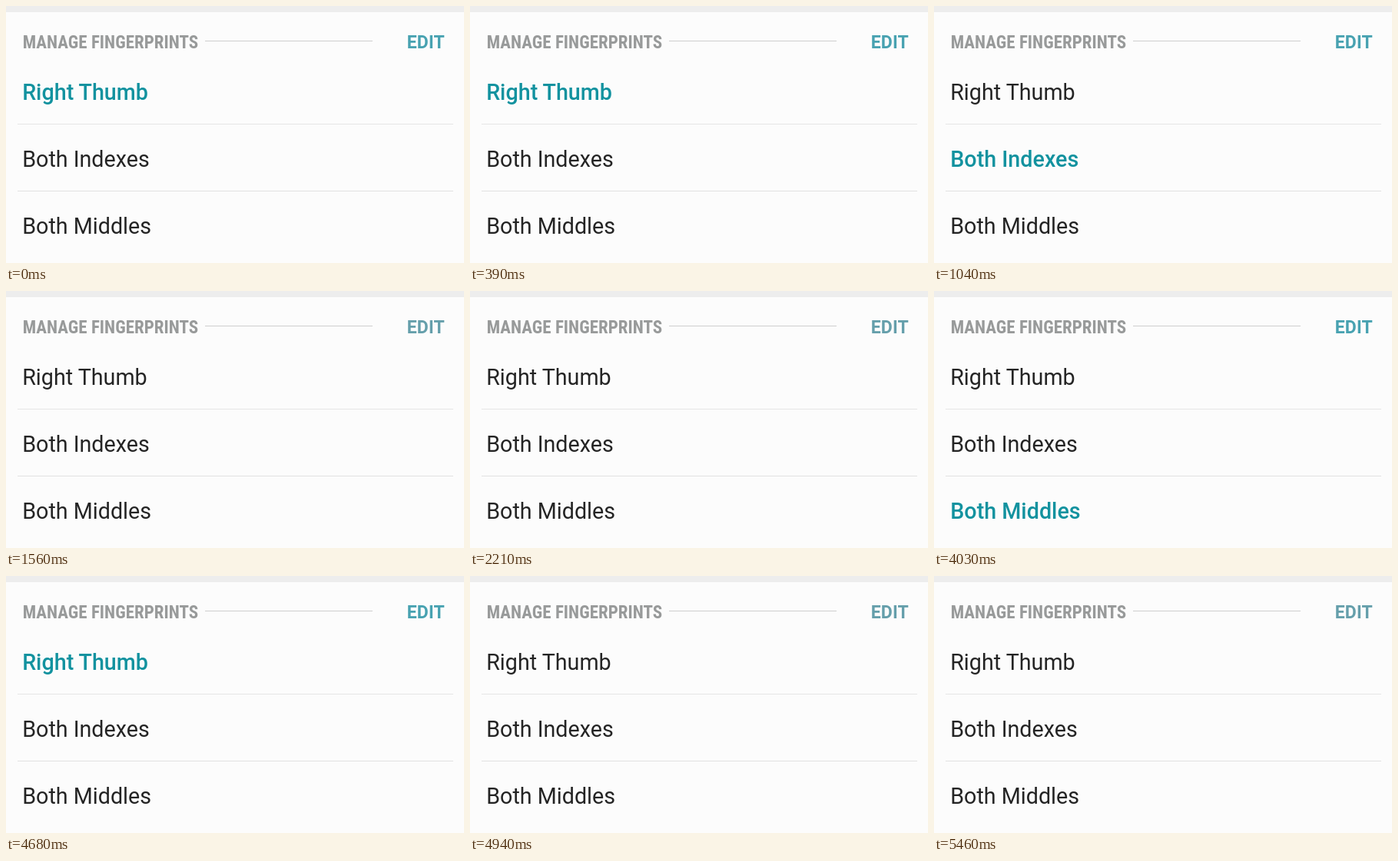
Animation of 596x334 px, one loop 5.98 s. Source, as an HTML page:

```html
<!DOCTYPE html>
<html lang="en">
<head>
<meta charset="utf-8">
<title>Manage fingerprints</title>
<style>
  html, body { margin: 0; width: 100%; height: 100%; overflow: hidden; background: #fcfcfc; }
  svg { display: block; width: 596px; height: 334px; }
  text { font-family: Roboto, sans-serif; }
  .title { font: 700 23px "Roboto Condensed", Roboto, sans-serif; font-stretch: 75%; fill: #989a9a; }
  #edit { font-size: 23px; font-weight: 700; letter-spacing: .2px; fill: #659fab; }
  #edit.lit { fill: #48a2b1; }
  .row { font-size: 28.7px; fill: #242424; }
  .row.lit { font-weight: 500; fill: #12929f; }
</style>
</head>
<body>
<svg viewBox="0 0 596 334">
  <rect width="596" height="334" fill="#fcfcfc"/>
  <rect width="596" height="8" fill="#ededed"/>
  <text class="title" x="21.7" y="54.5">MANAGE FINGERPRINTS</text>
  <rect x="259" y="45" width="218" height="1" fill="#cecece"/>
  <text id="edit" x="521.7" y="54.5">EDIT</text>
  <text class="row" x="21.2" y="121.5">Right Thumb</text>
  <rect x="15" y="153" width="567" height="1" fill="#e6e6e6"/>
  <text class="row" x="21.2" y="208.5">Both Indexes</text>
  <rect x="15" y="240" width="567" height="1" fill="#e2e2e2"/>
  <text class="row" x="21.2" y="296">Both Middles</text>
</svg>
<script>
  const LOOP = 5980;
  const THUMB = 0, INDEX = 1, MIDDLE = 2;

  // [start ms, end ms, row that lights up]
  const flashes = [
    [0, 130, THUMB], [390, 650, THUMB],
    [1040, 1560, INDEX], [1950, 2210, INDEX],
    [2600, 2860, MIDDLE], [4030, 4290, MIDDLE],
    [4680, 4940, THUMB], [5200, 5460, MIDDLE]
  ];
  const rows = document.querySelectorAll(".row");
  const edit = document.getElementById("edit");

  function draw(t) {
    const flash = flashes.find(([start, end]) => t >= start && t < end);
    rows.forEach((row, i) => row.classList.toggle("lit", !!flash && flash[2] === i));
    edit.classList.toggle("lit", !!flash);
  }

  const origin = performance.now();
  function tick() {
    draw((performance.now() - origin) % LOOP);
    requestAnimationFrame(tick);
  }
  draw(0);
  requestAnimationFrame(tick);
</script>
</body>
</html>
```
